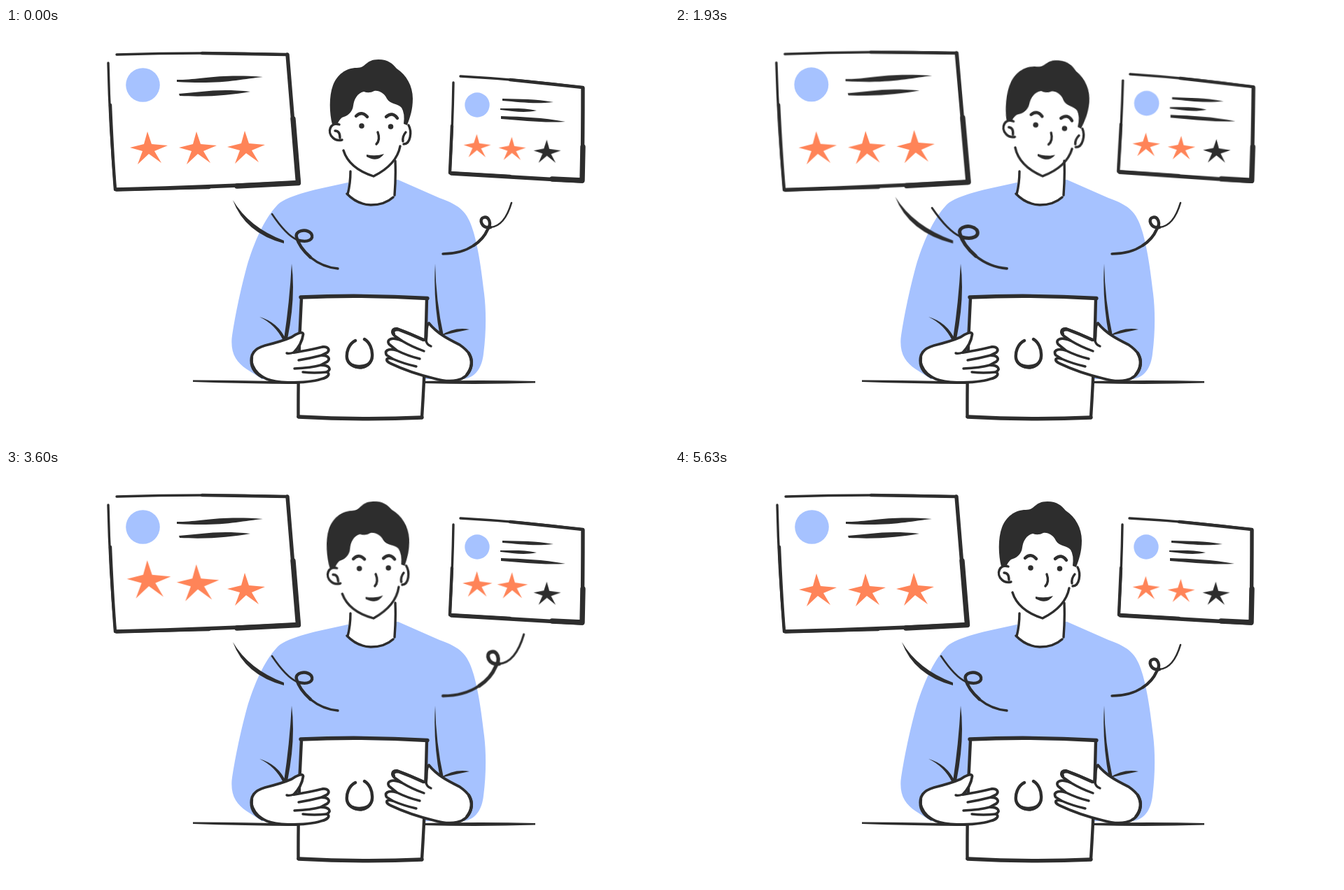
Write an HTML page without scripts that moves like this. It is 947 by 592 pixels and loops after 5.71 s.

```html
<!DOCTYPE html>
<html lang="en">
<head>
<meta charset="utf-8">
<title>Reviews</title>
<style>
html, body { margin: 0; width: 100%; height: 100%; overflow: hidden; background: #fff; }
svg { display: block; width: 947px; height: 592px; }
:root { --ink: #2d2d2d; --blue: #a6c2ff; --coral: #ff8458; --sine: cubic-bezier(.37, 0, .63, 1); }

.line { fill: none; stroke: var(--ink); stroke-width: 3.4; stroke-linecap: round; stroke-linejoin: round; }
.paper { fill: #fff; stroke: var(--ink); stroke-width: 3.8; stroke-linejoin: round; stroke-linecap: round; }
.ink { fill: var(--ink); }
.blue { fill: var(--blue); }
.coral { fill: var(--coral); }
.w2 { stroke-width: 2.6; }
.w4 { stroke-width: 4.4; }
.w5 { stroke-width: 5.4; }
.w7 { stroke-width: 7.4; }

.card, .hop { animation: tilt 2855ms var(--sine) infinite; }
.left { transform-origin: 281px 132px; --x: 1px; --y: -8.8px; --r: -3.6deg; --s: 1.065; }
.right { transform-origin: 731px 146px; --x: 8px; --y: -14.4px; --r: 6.8deg; --s: 1.09; }
@keyframes tilt {
  0%, 64.3%, 97.5%, 100% { transform: translate(0px, 0px) rotate(0deg) scale(1); }
  80.9% { transform: translate(var(--x), var(--y)) rotate(var(--r)) scale(var(--s)); }
}

.hop { animation-name: hop; --s: 1.2; }
.a { --h: -19px; animation-delay: -2655ms; }
.b { --h: -17px; animation-delay: -2335ms; }
.c { --h: -26px; animation-delay: -2075ms; }
.d { --h: -16px; animation-delay: -2765ms; }
@keyframes hop {
  0%, 31%, 100% { transform: translateY(0px) scale(1); }
  14% { transform: translateY(var(--h)) scale(var(--s)); }
}

.head, .pull { animation: nod 5710ms var(--sine) infinite; }
.head { transform-origin: 526px 213px; }
@keyframes nod {
  0%, .5%, 83%, 100% { transform: rotate(0deg); }
  10.5%, 35% { transform: rotate(5.6deg); }
  51%, 65% { transform: rotate(-2.6deg); }
}
.arc { transform-origin: 396px 306px; animation-name: arc; }
@keyframes arc {
  0%, .5%, 55%, 100% { transform: scale(1); }
  10.5%, 25% { transform: scale(1.236, 1.14); }
  43% { transform: scale(1.02, 1.01); }
}
.curl { transform-origin: 474px 344px; animation-name: curl; }
@keyframes curl {
  0%, .5%, 44.5%, 100% { transform: scale(1); }
  10.5%, 26% { transform: scale(1.22, 1.18); }
}
.tail { transform-origin: 624px 323px; animation-name: tail; }
@keyframes tail {
  0%, 35%, 83%, 100% { transform: scale(1); }
  51%, 65% { transform: scale(1.18, 1.205); }
}
</style>
</head>
<body>
<svg viewBox="0 0 947 592">
  <defs>
    <path id="star" d="M-2-24L4-6 27-4 8 4 18 21 0 8-16 23-9 4-27-1-7-6Z"/>
  </defs>

  <!-- body -->
  <path class="blue" d="M488 221C452 229 412 236 391 250C371 268 355 304 344 341C334 378 326 418 322.500 444C321 466 329 478 344 488L366 502H654C673 499 680 483 682 466C686 436 686 404 683 380C678 336 672 298 662 276C654 258 641 251 619 243L560 217Z"/>
  <path fill="#fff" d="M491 200L488 238C502 257 540 257 554 240L556 190Z"/>
  <path class="line" d="M492 205Q492 222 488 238M556 190Q557 214 555 239M487 237Q501 252 521 253Q541 253 553 242"/>
  <path class="ink" d="M408 337Q414 385 402 445H397Q405 392 408 337ZM362 413Q389 421 400 446L396 447Q385 424 362 413ZM613 337Q614 390 625 440L620 441Q610 390 613 337ZM621 440Q640 427 662 431Q642 435 621 440Z"/>

  <!-- desk and laptop -->
  <path class="ink" d="M267 503.500Q340 503.500 420 506V509Q340 508.500 267 506ZM596 505Q680 503 756 505V507.500Q680 510 596 508Z"/>
  <path fill="#fff" d="M421 385L602 387 594 557 417 556Z"/>
  <path class="line w4" d="M422 386Q417 470 417.500 556M601 387Q599 480 594 557"/>
  <path class="line w5" d="M421 385Q510 381 602 386.500M418 556Q510 561 594 557"/>
  <path class="line w4" d="M499 447C489 452 486 464 487 472C490 489 521 490 523 470C524 459 519 449 512 445"/>
  <path class="ink" d="M485 472C489 492 521 494 525 471C518 484 494 486 485 472Z"/>

  <!-- hands -->
  <path class="paper" d="M352 482C347 466 356 458 370 454C386 450 399 446 408 442C415 437 424 433 424.500 438C423 449 417 458 411 464C426 462 440 459 452 456C460 455 463 460 459 464L451 468C460 468 464 473 459 477L450 482C463 482 465 489 458 492C464 494 460 500 450 502C438 506 420 507 403 507C381 506 361 503 352 482Z"/>
  <path class="line" d="M411 464Q405 466 401 465M451 468Q436 472 418 475M450 482Q436 486 412 487M458 492Q440 494 424 492"/>
  <path class="line w4" d="M351 471Q348 489 366 499"/>
  <path class="paper" d="M664 486C668 471 661 462 648 453C632 445 616 437 604 422C599 426 602 434 600 447C586 441 571 434 559 430C551 429 550 436 555 440L565 447C550 441 543 446 547 452L558 461C544 457 540 463 544 468L552 473C542 470 541 476 550 480C569 489 590 496 611 501C635 508 658 506 664 486Z"/>
  <path class="line" d="M600 447Q601 453 607 455M565 447Q580 456 597 462M558 461Q574 469 591 473M552 473Q568 480 586 484"/>
  <path class="line w4" d="M554 438Q551 431 560 431Q579 438 596 446M661 465Q670 481 658 496"/>

  <!-- head -->
  <g class="head">
    <path class="ink" d="M466 138C462 122 461 98 467 82C473 67 485 57 501 57C515 57 513 45 532 45C546 45 552 51 558 58C572 67 581 83 581 101C581 117 577 128 573 139L568 137Q570 122 565 114C560 108 548 109 544 101C540 93 533 89 526 90Q519 94 511 91C502 93 497 102 496 111C495 121 487 126 480 128Q475 132 473 139Z"/>
    <path class="line" d="M476 138C463 134 458 149 467 157Q472 162 480 160M470 147Q477 147 477 157M575 139C580 148 578 166 568 166M571 149Q566 155 567 162"/>
    <path class="line" d="M482 175C487 191 500 204 525 212C541 204 559 190 563 169"/>
    <path class="line w4" d="M500 126Q508 118 516 127M543 127Q552 119 559 129"/>
    <path class="line" d="M531 149Q535 160 529 166"/>
    <path class="ink" d="M515 181Q528 184 540 180Q531 193 515 184Z"/>
    <circle class="ink" cx="508" cy="140" r="3.8"/>
    <circle class="ink" cx="549.500" cy="141" r="3.8"/>
  </g>

  <!-- squiggles -->
  <path class="pull arc ink" d="M324 246Q347 285 397 304V308Q341 293 324 246Z"/>
  <g class="pull curl">
    <path class="line w2" d="M380 266C390 281 402 297 416 303"/>
    <path class="line w4" d="M416 303C431 308 441 302 436 294C428 286 412 290 415 299C418 311 426 320 435 328"/>
    <path class="line" d="M435 328Q452 342 474 344"/>
  </g>
  <g class="pull tail">
    <path class="line w2" d="M722 250C716 270 706 284 692 285"/>
    <path class="line w4" d="M692 285C679 287 675 273 682 271C690 268 694 280 688 288Q682 302 668 311"/>
    <path class="line" d="M668 311Q650 323 624 323"/>
  </g>

  <!-- large card -->
  <g class="card left">
    <path class="line" d="M146 50Q148 140 156 231M158 38Q280 34 402 38"/>
    <path class="line w4" d="M149 110Q152 180 156 231L290 228M280 36L402 38"/>
    <path class="line w5" d="M402 38Q409 130 418 221Q300 227 158 231"/>
    <path class="line w7" d="M410 130L417.500 221.500 330 226"/>
    <circle class="blue" cx="195.500" cy="81.500" r="24.300"/>
    <path class="ink" d="M244 74C275 75 300 65 367 70C335 73 310 81 244 77ZM247 94C280 92 300 86 349 91C320 96 290 99 248 97Z"/>
    <g class="coral">
      <g transform="translate(204 172)"><use class="hop a" href="#star"/></g>
      <g transform="translate(274 172)"><use class="hop b" href="#star"/></g>
      <g transform="translate(343 171)"><use class="hop c" href="#star"/></g>
    </g>
  </g>

  <!-- small card -->
  <g class="card right">
    <path class="line" d="M639 78Q638 140 634 206M649 69Q740 74 824 85"/>
    <path class="line w4" d="M637 140L634 207 720 212M720 74L824 85"/>
    <path class="line w5" d="M824 86Q824 150 823 219Q740 214 636 208"/>
    <path class="line w7" d="M824 170L823 218 780 216"/>
    <circle class="blue" cx="673" cy="110" r="17.700"/>
    <path class="ink" d="M709 101C735 102 755 101 782 106C755 109 735 106 709 104ZM706 115C725 115 740 114 758 118C740 122 725 119 706 117ZM707 126C740 127 765 128 799 134C765 136 740 132 707 130Z"/>
    <g class="coral">
      <g transform="translate(673 169) rotate(3) scale(.72)"><use class="hop d" href="#star"/></g>
      <g transform="translate(723 173) rotate(3) scale(.72)"><use class="hop b" href="#star"/></g>
    </g>
    <use class="ink" href="#star" transform="translate(773 177) rotate(3) scale(.72)"/>
  </g>
</svg>
</body>
</html>
```
